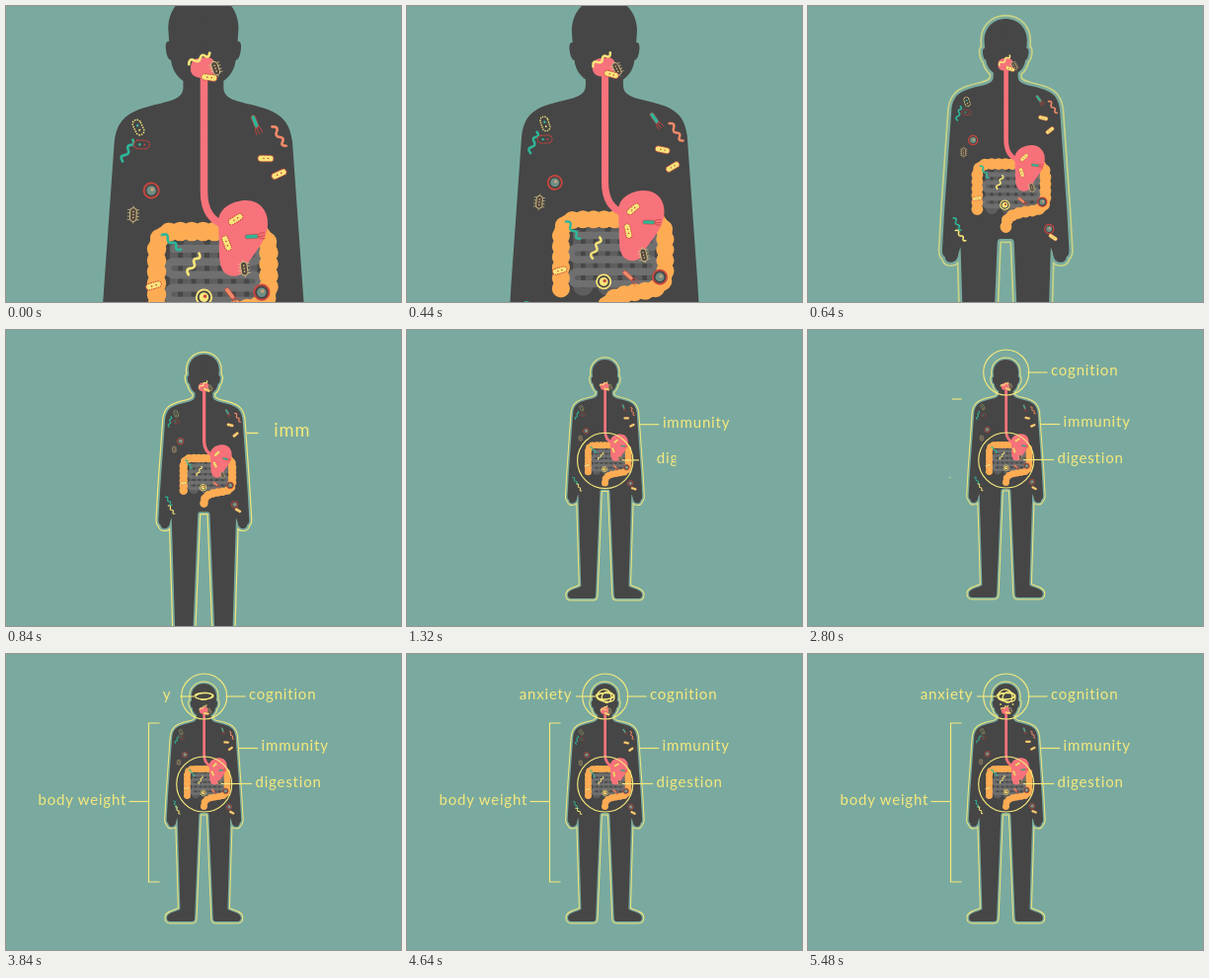
An HTML page for the animation above (5520 ms loop, 400 by 300 pixels).

```html
<!DOCTYPE html>
<html lang="en">
<head>
<meta charset="utf-8">
<title>Gut and body</title>
<style>
  html, body { margin: 0; width: 100%; height: 100%; overflow: hidden; background: #7aaa9f; }
  svg { display: block; width: 400px; height: 300px; }
  text { font: 15px Lato, "Open Sans", sans-serif; letter-spacing: .8px; fill: #f5e97c; }
  .line { fill: none; stroke: #f5e97c; stroke-width: 1.15; }
</style>
</head>
<body>
<svg id="stage" viewBox="0 0 400 300">
  <defs>
    <pattern id="dots" width="2.6" height="2.6" patternUnits="userSpaceOnUse">
      <rect width="2.6" height="2.6" fill="#f76d76"/>
      <circle cx=".7" cy=".7" r=".5" fill="#fa878c"/>
      <circle cx="2" cy="2" r=".5" fill="#fa878c"/>
    </pattern>
    <path id="half" d="M-.3,30 C8,30 12.7,36 12.7,43 L12.4,47.6 Q13.9,47.4 13.6,50.5 Q13.1,54.4 11.7,54.5
      C11.3,58 9.5,60.5 7.3,62 L7.3,64.5 C7.4,68 11,69 15,70 C26,72.5 31,74.5 32.2,84 L36.3,142
      L37.7,167 Q38,171 36.2,171.6 Q35.6,175 33,175 C30,175 28.4,173 28,169 L26.8,166 L24,258.5
      C27,261.5 37,261.5 37.4,267 Q37.6,271 34,271 L12,271 Q9.4,271 9.3,267.5 L5,163 Q4.8,161 3,161 L-.3,161"/>
    <g id="body">
      <use href="#half" transform="translate(200.4 0)"/>
      <use href="#half" transform="translate(200.4 0) scale(-1 1)"/>
    </g>
    <path id="colon" fill="none" stroke-linecap="round" d="M152.5,304 L152.5,248 Q152.5,228.5 172,228.5 L246,228.5
      Q266,228.5 266,248 L266,285 Q266,303 248,306 C225,309 203,311 201,327 L200,335"/>
  </defs>
  <g id="camera">
    <g id="halo" fill="none" stroke-linejoin="round">
      <use href="#body" stroke="#f0e67a" stroke-width="5"/>
      <use href="#body" stroke="#7aaa9f" stroke-width="3"/>
    </g>
    <use href="#body" fill="#464646"/>
    <g id="organs" transform="translate(200.7 54.2) scale(.35714) translate(-200.7 -54.2)">
      <g id="gut" fill="none" stroke-linecap="round" stroke-linejoin="round"></g>
      <use href="#colon" stroke="#fdac53" stroke-width="16"/>
      <use href="#colon" stroke="#fdac53" stroke-width="19.5" stroke-dasharray="0 11.5"/>
      <path d="M200.5,66 V188 C200.5,208 208,217 222,223" fill="none" stroke="url(#dots)" stroke-width="7.6"/>
      <path d="M215,218 C216,203 232,197 243,197 C258,197 266,209 265,222 C264,240 248,253 242,266
        C238,275 228,276 221,270 C214,262 216.5,245 215.5,233 Z" fill="url(#dots)"/>
      <path d="M187,62 C188,51 198,53 202,52 C210,51 213,58 211,64 C210,73 204,74 199,73 C191,73 186,69 187,62 Z" fill="url(#dots)"/>
      <g id="microbes"></g>
    </g>
    <g id="notes"></g>
  </g>
</svg>
<script>
const LOOP = 5520, STEP = 40;
const YELLOW = "#f8e57a", RED = "#c9463f", TEAL = "#2eb698", PINK = "#f08a68";
const $ = id => document.getElementById(id);

function add(parent, tag, attrs) {
  const el = document.createElementNS("http://www.w3.org/2000/svg", tag);
  for (const k in attrs) el.setAttribute(k, attrs[k]);
  return parent.appendChild(el);
}
const clamp = x => Math.max(0, Math.min(1, x));
const span = (t, start, length) => clamp((t - start) / length);
const easeOut = x => 1 - Math.pow(1 - x, 1.4);
const sineInOut = x => (1 - Math.cos(Math.PI * x)) / 2;

// cubic-bezier(.75, 0, .05, 1)
function zoomEase(x) {
  let lo = 0, hi = 1;
  for (let i = 0; i < 24; i++) {
    const s = (lo + hi) / 2, r = 1 - s;
    if (2.25 * s * r * r + .15 * s * s * r + s * s * s < x) lo = s; else hi = s;
  }
  return lo * lo * (3 - 2 * lo);
}

// Woven small intestine: two serpentines with gaps between them
function buildGut() {
  let rows = "M170,246", cols = "M170,244";
  for (let i = 0; i < 5; i++) {
    const right = i % 2 === 0;
    rows += `H${right ? 250 : 170}` + (i < 4 ? `a6.6,6.6 0 0 ${right ? 1 : 0} 0,13.2` : "");
  }
  for (let i = 0; i < 7; i++) {
    const down = i % 2 === 0;
    cols += `V${down ? 301 : 244}` + (i < 6 ? `a6.7,6.7 0 0 ${down ? 0 : 1} 13.4,0` : "");
  }
  const layers = [[cols, "#5e5e5e", 8.5], [rows, "#6f6f6f", 8]];
  for (const [d, stroke, width] of layers) add($("gut"), "path", { d, stroke, "stroke-width": width });
}

const kinds = {
  rod(g, fill = YELLOW) {
    add(g, "rect", { x: -8, y: -3.2, width: 16, height: 6.4, rx: 3.2, fill, stroke: RED,
      "stroke-width": 1, "stroke-dasharray": "1.6 .8" });
    for (const x of [-2, 2.5]) add(g, "circle", { cx: x, cy: 0, r: .8, fill: RED });
  },
  dotted(g, color = YELLOW) {
    add(g, "rect", { x: -8, y: -4.2, width: 16, height: 8.4, rx: 4.2, fill: "#464646", stroke: color,
      "stroke-width": 1.5, "stroke-dasharray": "1.5 1.1" });
    add(g, "circle", { cx: -2, cy: 0, r: 1.3, fill: TEAL });
    add(g, "circle", { cx: 3, cy: 0, r: 1, fill: color });
  },
  spiky(g, color = "#d9c58a") {
    add(g, "path", { d: "M-5,-6V6M-1.7,-6V6M1.7,-6V6M5,-6V6M-9,0H9", stroke: color, "stroke-width": .7 });
    add(g, "rect", { x: -7, y: -3.3, width: 14, height: 6.6, rx: 3.3, fill: "#54483f", stroke: color, "stroke-width": .9 });
    for (const x of [-3, 0, 3]) add(g, "circle", { cx: x, cy: 0, r: .8, fill: color });
  },
  worm(g, stroke = YELLOW, width = 2.7) {
    add(g, "path", { d: "M-12,1 Q-9,-5 -5.5,-.5 T1,0 T6.5,0 T12,-1", fill: "none", stroke,
      "stroke-width": width, "stroke-linecap": "round" });
  },
  tailed(g, color = TEAL) {
    add(g, "path", { d: "M3,0 Q7,-4 12,-3 M3,0 Q8,1 12,0 M3,0 Q7,4 12,3", fill: "none", stroke: RED, "stroke-width": .9 });
    add(g, "rect", { x: -8, y: -2.1, width: 13, height: 4.2, rx: 1.8, fill: color, stroke: RED, "stroke-width": .6 });
  },
  round(g, color = RED) {
    add(g, "circle", { r: 7.6, fill: "#464646", stroke: color, "stroke-width": 1.9 });
    add(g, "circle", { r: 4.8, fill: color === RED ? "#6f8f84" : color });
    add(g, "circle", { r: 1.8, cx: 1, cy: -1, fill: color === RED ? "#c6a27e" : RED });
  }
};

// kind, x, y, angle, colour
const microbes = [
  ["dotted", 134, 123, 65], ["worm", 122, 145, -68, TEAL], ["dotted", 136, 142, 4, RED],
  ["round", 147, 187, 0], ["spiky", 130, 210, 88], ["tailed", 254, 120, 62],
  ["worm", 277, 132, 64, PINK], ["rod", 262, 153, 6], ["rod", 275, 172, -32],
  ["rod", 232, 216, -35], ["tailed", 251, 232, 4], ["rod", 225, 242, 70],
  ["spiky", 242, 266, 74], ["worm", 189.5, 260, -58], ["worm", 166, 241, 50, TEAL],
  ["round", 199.5, 295, 0, YELLOW], ["tailed", 228, 291, 45, PINK], ["rod", 151, 285, -12],
  ["round", 260, 290, 0], ["worm", 118, 330, 62, TEAL], ["worm", 126, 347, 55],
  ["round", 273, 335, 0], ["rod", 280, 352, 25],
  ["worm", 197, 55, -32], ["spiky", 213.5, 63, 70], ["rod", 206, 71, 15]
].map(([kind, x, y, angle, color], i) => {
  const el = add($("microbes"), "g", {});
  kinds[kind](el, color);
  return { el, x, y, angle, i };
});

function moveMicrobes(t) {
  for (const { el, x, y, angle, i } of microbes) {
    const w = Math.PI * 2 * t / LOOP * (2 + i % 3);
    const dx = 1.5 * Math.sin(w + i), dy = 1.8 * Math.sin(w * .8 + i * 2.1);
    const turn = 8 * Math.sin(w + i * 1.7);
    el.setAttribute("transform", `translate(${x + dx} ${y + dy}) rotate(${angle + turn})`);
  }
}

const notes = $("notes");
function stroke(d, start, length, ease = x => x, width = 1.15) {
  const el = add(notes, "path", { d, class: "line", pathLength: 1 });
  el.style.strokeWidth = width;
  return t => {
    const p = ease(span(t, start, length));
    el.style.visibility = p > 0 ? "visible" : "hidden";
    el.setAttribute("stroke-dasharray", p < 1 ? `${p} 2` : "none");
  };
}

function ring(cx, cy, r, start) {
  const el = add(notes, "circle", { cx, cy, class: "line" });
  return t => {
    const p = span(t, start, 220);
    el.style.visibility = p > 0 ? "visible" : "hidden";
    el.setAttribute("r", r * (1 - Math.pow(1 - p, 3)));
  };
}

function label(text, x, y, width, start, length, fromRight) {
  const id = "wipe-" + text.replace(" ", "-");
  const clip = add(notes, "clipPath", { id });
  const rect = add(clip, "rect", { y: y - 16, height: 24 });
  add(notes, "text", { x, y, "clip-path": `url(#${id})` }).textContent = text;
  return t => {
    const w = (width + 4) * easeOut(span(t, start, length));
    rect.setAttribute("width", w);
    rect.setAttribute("x", fromRight ? x + width + 2 - w : x - 2);
  };
}

function speck(x, y, start) {
  const el = add(notes, "circle", { r: .9, fill: "#d9dc6c" });
  return t => {
    const p = easeOut(span(t, start, 700));
    el.style.visibility = p > 0 ? "visible" : "hidden";
    el.setAttribute("cx", 201 + (x - 201) * p);
    el.setAttribute("cy", 57 + (y - 57) * p);
  };
}

const parts = [
  stroke("M236,95.5 H255", 660, 350),
  label("immunity", 258.6, 98.3, 69, 695, 440),
  ring(200.7, 132, 28, 1080),
  stroke("M218,131.5 H249", 1130, 350),
  label("digestion", 252.5, 135, 67, 1220, 440),
  ring(200.7, 43, 23, 1560),
  stroke("M222.5,43 H242.5", 1710, 350),
  label("cognition", 246, 45.6, 69, 1790, 420),
  stroke("M155.5,70 H144.5 V231 H155.5", 2690, 750, sineInOut),
  stroke("M144.5,149.5 H124.5", 2780, 350),
  label("body weight", 32.5, 153, 88, 2980, 520, true),
  stroke("M191,42 C195,38 207,39 210,42 C211,46 196,47 192,44 C190,40 205,38 209,41 " +
    "C210,45 199,48 194,45 C190,40 197,35 201,36 C207,37 209,46 204,49 " +
    "C199,51 195,44 199,40 C204,35 213,42 209,47 C205,50 193,48 192,43", 3320, 1120, undefined, 1.3),
  stroke("M191,43 H171", 3580, 350),
  label("anxiety", 113.8, 45.6, 54, 3780, 440, true),
  speck(195, 51, 4520),
  speck(207.5, 51, 4600)
];

function draw(t) {
  const zoom = 2.8 - 1.8 * zoomEase(span(t, 0, 1440));
  $("camera").setAttribute("transform", `translate(200.7 54.2) scale(${zoom}) translate(-200.7 -54.2)`);
  $("halo").setAttribute("opacity", span(t, 480, 240));
  moveMicrobes(t);
  for (const part of parts) part(t);
}

buildGut();
const begin = performance.now();
function tick() {
  const t = (performance.now() - begin) % LOOP;
  draw(Math.floor(t / STEP) * STEP);
  requestAnimationFrame(tick);
}
tick();
</script>
</body>
</html>
```
